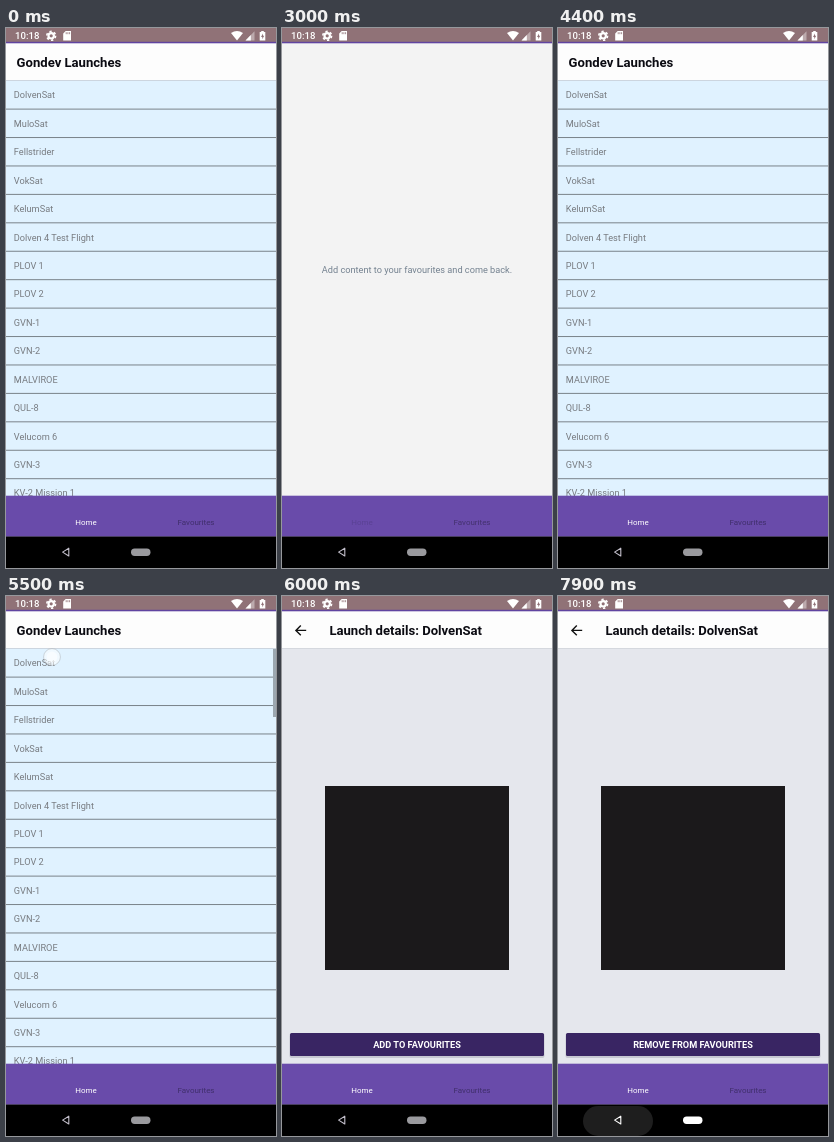
Recreate the animation shown at these times as an HTML page. Size 270 px wide and 540 px high, loop 8000 ms.

```html
<!DOCTYPE html>
<html lang="en">
<head>
<meta charset="utf-8">
<title>Launch list</title>
<style>
  html, body { margin: 0; width: 100%; height: 100%; overflow: hidden; background: #000; }
  svg { display: block; width: 100vw; height: 100vh; font-family: Roboto, sans-serif; }
  .title { font-size: 13.1px; font-weight: 600; fill: #0b0b12; }
  .row { font-size: 9.2px; fill: #777b80; }
  .tab { font-size: 8px; text-anchor: middle; }
  .button { font-size: 9.2px; font-weight: 600; fill: #fff; text-anchor: middle; }
</style>
</head>
<body>
<svg viewBox="0 0 270 540" preserveAspectRatio="none">
  <rect width="270" height="540" fill="#f3f3f3"/>

  <g id="favourites">
    <text x="135" y="245.4" class="row" text-anchor="middle" style="fill:#748290">Add content to your favourites and come back.</text>
  </g>

  <g id="list">
    <rect y="52" width="270" height="416" fill="#e0f2ff"/>
    <g id="rows"></g>
    <rect y="15" width="270" height="37" fill="#fdfdfd"/>
    <rect y="52" width="270" height="1" fill="#ccd5df"/>
    <text x="10.6" y="39.4" class="title">Gondev Launches</text>
    <rect id="scrollbar" x="267" y="53" width="3" height="68" fill="#9ca7b0"/>
  </g>

  <g id="details">
    <rect y="15" width="270" height="453" fill="#e5e7ed"/>
    <rect y="15" width="270" height="37" fill="#fdfdfd"/>
    <rect y="52" width="270" height="1" fill="#d5d8de"/>
    <path d="M24.2 34.4H14M18.8 29.5L13.9 34.4L18.8 39.3" fill="none" stroke="#111" stroke-width="1.4"/>
    <text x="47.4" y="39.4" class="title">Launch details: DolvenSat</text>
    <rect x="43" y="190" width="184" height="184" fill="#1b191b"/>
    <rect x="7.5" y="438" width="255" height="24" rx="2" fill="#c6c7d1"/>
    <rect x="8" y="437" width="254" height="23" rx="1.5" fill="#392563"/>
    <text id="action" x="135" y="452.2" class="button"></text>
  </g>

  <rect y="467.7" width="270" height="41" fill="#694baa"/>
  <text id="homeTab" x="80" y="497" class="tab">Home</text>
  <text id="favTab" x="190" y="497" class="tab">Favourites</text>
  <rect id="tabRipple" x="58" y="507" width="46" height="1.2" fill="#a796cf"/>

  <rect y="508.5" width="270" height="31.5" fill="#000"/>
  <rect id="backRipple" y="510" height="30" rx="15" fill="#1e1e1e"/>
  <path id="back" d="M62.8 520.2V528L56.6 524.1Z" fill="none" stroke-width="1.1" stroke-linejoin="round"/>
  <rect id="pill" x="125" y="520.5" width="19.5" height="7.4" rx="3.7"/>

  <rect width="270" height="14" fill="#907277"/>
  <rect y="13.8" width="270" height="1.5" fill="#6044a0"/>
  <g fill="#fff">
    <text x="9" y="11.4" font-size="9.6" font-weight="500">10:18</text>
    <circle cx="45.2" cy="7.8" r="2.7" fill="none" stroke="#fff" stroke-width="2.2"/>
    <circle cx="45.2" cy="7.8" r="4.4" fill="none" stroke="#fff" stroke-width="1.6" stroke-dasharray="2.3 2.308"/>
    <path d="M59.7 3H65V12.6H57.2V5.5Z"/>
    <path d="M60.2 4.2V6.2M61.9 4.2V6.2M63.6 4.2V6.2" stroke="#907277" stroke-width=".8"/>
    <path d="M225 5.1Q231 .9 237 5.1L231 12.6Z"/>
    <path d="M239.5 12.4L248.5 3.2V12.4Z" opacity=".4"/>
    <path d="M239.5 12.4L244.8 7V12.4Z"/>
    <path d="M255.2 3H257.8V4H259.3V12.6H253.7V4H255.2Z"/>
    <path d="M257 5.4L255 8.9H256.3V11.3L258.2 7.8H257Z" fill="#907277"/>
  </g>

  <g id="touch">
    <circle r="8.4" fill="#fff" fill-opacity=".5" stroke="#777" stroke-opacity=".35" stroke-width=".8"/>
    <circle r="5.4" fill="#fff" fill-opacity=".5"/>
  </g>
</svg>
<script>
const LOOP = 8000, STEP = 100;
const $ = id => document.getElementById(id);
const set = (id, attrs) => {
  for (const key in attrs) $(id).setAttribute(key, attrs[key]);
};
const show = (id, on) => { $(id).style.display = on ? '' : 'none'; };
const within = (t, from, to) => t >= from && t < to;

const missions = ['DolvenSat', 'MuloSat', 'Fellstrider', 'VokSat', 'KelumSat',
  'Dolven 4 Test Flight', 'PLOV 1', 'PLOV 2', 'GVN-1', 'GVN-2', 'MALVIROE',
  'QUL-8', 'Velucom 6', 'GVN-3', 'KV-2 Mission 1'];
const rowHeight = 28.43;
$('rows').innerHTML = missions.map((name, i) =>
  `<text class="row" x="7.8" y="${70.4 + i * rowHeight}">${name}</text>
   <rect y="${80.6 + i * rowHeight}" width="270" height="1" fill="#7a838a"/>`
).join('');

const taps = [
  { from: 2800, to: 3000, x: 190, y: 489 },
  { from: 4200, to: 4400, x: 71, y: 489 },
  { from: 5500, to: 5700, x: 46, y: 61 }
];

function tabColours(t) {
  if (within(t, 3000, 4200)) return ['#5a4294', '#44326f'];
  if (within(t, 4200, 4400)) return ['#49366f', '#fff'];
  return ['#fff', '#402f6c'];
}

function render(t) {
  const onFavourites = within(t, 3000, 4400);
  show('favourites', onFavourites);
  show('list', !onFavourites);
  show('scrollbar', t >= 5500);

  // Details fade in while rising
  const p = Math.min(1, Math.max(0, (t - 5600) / 400));
  const eased = 1 - (1 - p) ** 2;
  show('details', p > 0);
  set('details', { opacity: eased, transform: `translate(0 ${30 * (1 - eased)})` });
  $('action').textContent = t < 6600 ? 'ADD TO FAVOURITES' : 'REMOVE FROM FAVOURITES';

  const [home, fav] = tabColours(t);
  set('homeTab', { fill: home });
  set('favTab', { fill: fav });
  show('tabRipple', within(t, 4300, 4400));

  const tap = taps.find(tap => within(t, tap.from, tap.to));
  show('touch', tap);
  if (tap) set('touch', { transform: `translate(${tap.x} ${tap.y})` });

  const pressed = t >= 7700;
  const half = 35 * Math.min(1, .6 + (t - 7700) / 500);
  show('backRipple', pressed);
  if (pressed) set('backRipple', { x: 60 - half, width: 2 * half });
  set('back', { stroke: pressed ? '#fff' : '#c4c0cc' });
  set('pill', { fill: pressed ? '#fff' : '#9a9a9e' });
}

const start = performance.now();
function tick() {
  const t = (performance.now() - start) % LOOP;
  render(Math.floor(t / STEP) * STEP);
  requestAnimationFrame(tick);
}
tick();
</script>
</body>
</html>
```
